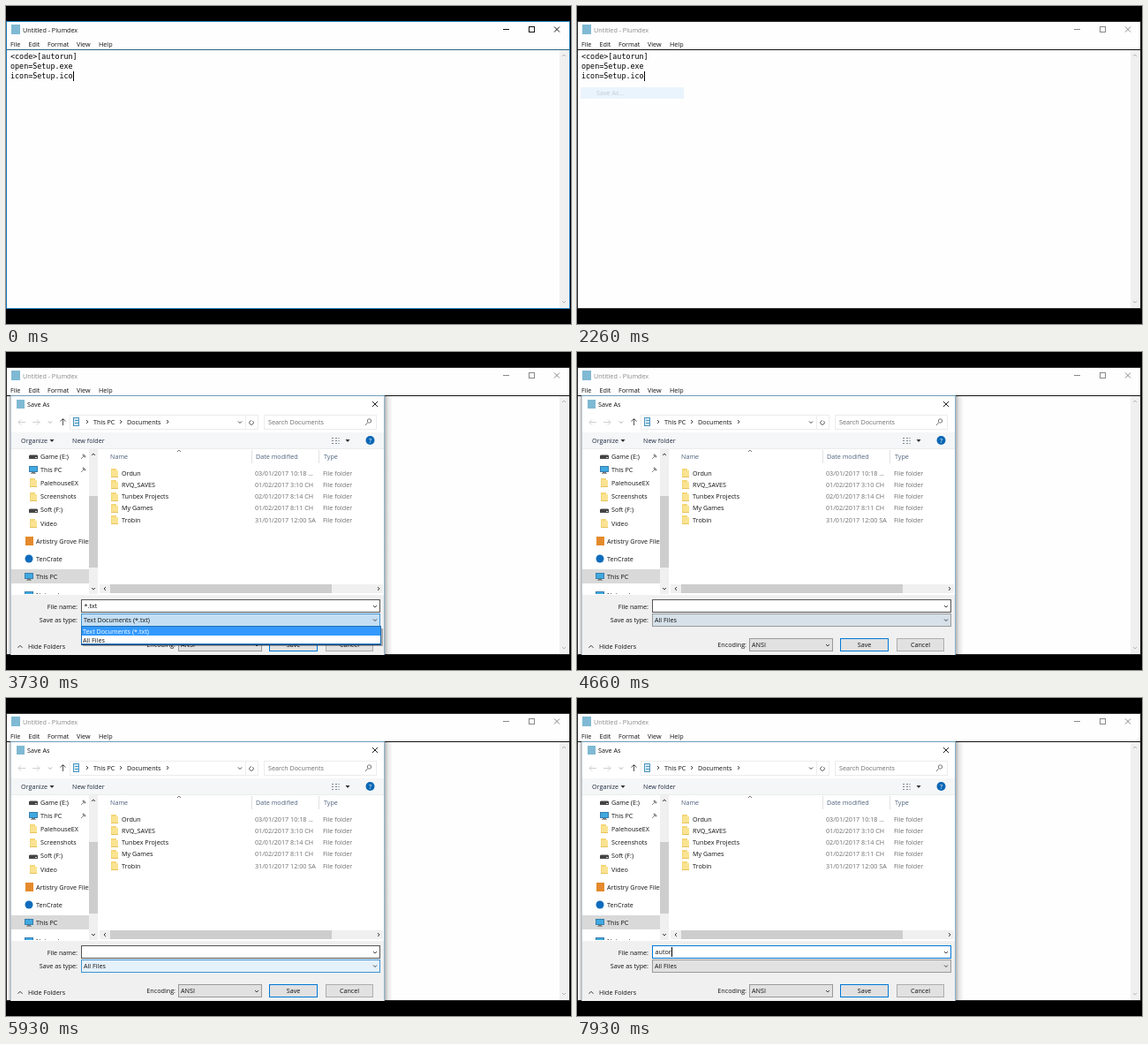
Recreate the animation shown at these times as an HTML page with a canvas. Size 640 by 360 pixels, loop 8 s.

```html
<!DOCTYPE html>
<html lang="en">
<head>
<meta charset="utf-8">
<title>Saving an autorun file</title>
<style>
html, body { margin: 0; width: 100%; height: 100%; overflow: hidden; background: #000; }
canvas { display: block; }
</style>
</head>
<body>
<canvas id="stage" width="640" height="360"></canvas>
<script>
const c = document.getElementById('stage').getContext('2d');
const LOOP = 8000;
const UI = '7.2px "Open Sans", "Noto Sans", sans-serif';
const MONO = '8.4px "DejaVu Sans Mono", "Liberation Mono", monospace';
const BLUE = '#0078d7', PICKED = '#3399ff', INK = '#111', GREY = '#6d6d6d';

// Moments at which the picture switches, in ms
const T = {
  menu: 1130, hover: 1600, pick: 2130, dialog: 2420,
  open: 3330, hoverAll: 4060, choose: 4330, focus: 6330
};
const TYPED = 'autor', TYPE_AT = 7330, KEY_MS = 133, BLINK = 530;

const clamp = v => Math.max(0, Math.min(1, v));
const ramp = (t, from, ms) => clamp((t - from) / ms);

function mix(a, b, k) {
  return `rgb(${a.map((v, i) => Math.round(v + (b[i] - v) * k)).join(',')})`;
}

function box(x, y, w, h, fill, edge) {
  if (fill) { c.fillStyle = fill; c.fillRect(x, y, w, h); }
  if (edge) { c.strokeStyle = edge; c.lineWidth = 1; c.strokeRect(x + .5, y + .5, w - 1, h - 1); }
}

// y is the middle of the capitals
function text(s, x, y, color = INK, align = 'left', font = UI) {
  c.font = font;
  c.textAlign = align;
  c.fillStyle = color;
  c.fillText(s, x, Math.round(y + 2.6));
}

function line(color, width, ...p) {
  c.strokeStyle = color;
  c.lineWidth = width;
  c.beginPath();
  for (let i = 0; i < p.length; i += 2) c.lineTo(p[i], p[i + 1]);
  c.stroke();
}

function disc(x, y, r, color) {
  c.fillStyle = color;
  c.beginPath();
  c.arc(x, y, r, 0, 7);
  c.fill();
}

function clip(x, y, w, h, draw) {
  c.save();
  c.beginPath();
  c.rect(x, y, w, h);
  c.clip();
  draw();
  c.restore();
}

// Soft shade that runs from x0 (dark) to x1 (clear)
function shade(x0, x1, y, h) {
  const g = c.createLinearGradient(x0, 0, x1, 0);
  g.addColorStop(0, 'rgba(0,0,0,.3)');
  g.addColorStop(.4, 'rgba(0,0,0,.1)');
  g.addColorStop(1, 'rgba(0,0,0,0)');
  box(Math.min(x0, x1), y, Math.abs(x1 - x0), h, g);
}

const down = (x, y, col = '#444', s = 2) => line(col, 1, x - s, y - s / 2, x, y + s / 2, x + s, y - s / 2);
const up = (x, y, col = '#444', s = 2) => line(col, 1, x - s, y + s / 2, x, y - s / 2, x + s, y + s / 2);
const right = (x, y, col = '#444', s = 2) => line(col, 1, x - s / 2, y - s, x + s / 2, y, x - s / 2, y + s);
const left = (x, y, col = '#444', s = 2) => line(col, 1, x + s / 2, y - s, x - s / 2, y, x + s / 2, y + s);

function triangle(x, y) {
  c.fillStyle = '#333';
  c.beginPath();
  c.moveTo(x - 2.5, y - 1);
  c.lineTo(x + 2.5, y - 1);
  c.lineTo(x, y + 2);
  c.fill();
}

function cross(x, y, col) {
  line(col, 1, x - 3, y - 3, x + 3, y + 3);
  line(col, 1, x + 3, y - 3, x - 3, y + 3);
}

function folder(x, y) {
  box(x, y - 5, 6, 10, '#f5d778');
  box(x + 1, y - 3, 7, 8, '#fae391');
  box(x, y + 4, 8, 1, '#e6c25c');
}

function drive(x, y) {
  box(x, y - 1, 10, 4, '#444');
  box(x + 1, y - 2, 8, 1, '#aaa');
  box(x + 7, y + 1, 2, 1, '#ddd');
}

function monitor(x, y) {
  box(x, y - 4, 10, 7, '#3fa9e0', '#3a7fae');
  box(x + 3, y + 3, 4, 1, '#777');
  box(x + 2, y + 4, 6, 1, '#999');
}

function pin(x, y) {
  line('#8a8a8a', 1, x - 3, y + 3, x, y);
  line('#8a8a8a', 2, x - 1, y - 2, x + 2, y + 1);
}

function editor(t) {
  const active = t < T.pick;
  const ink = active ? INK : '#888';
  box(0, 17, 639, 326, '#fefefe', active ? '#1a78b8' : '#222');
  box(6, 21, 10, 11, '#7fb9d3');
  text('Untitled - Plumdex', 19, 27, ink);
  line(ink, 1, 563, 26.5, 570, 26.5);
  box(592, 23, 7, 7, null, ink);
  cross(624, 26.5, ink);
  [['File', 5], ['Edit', 25.5], ['Format', 47], ['View', 80], ['Help', 105]]
    .forEach(([s, x]) => text(s, x, 43));
  box(1, 49, 637, 1, active ? '#2b6480' : '#111');
  box(627, 50, 11, 292, '#f0f0f0');
  up(632, 56, '#b5b5b5');
  down(632, 335, '#b5b5b5');

  ['<code>[autorun]', 'open=Setup.exe', 'icon=Setup.ico']
    .forEach((s, i) => text(s, 5, 57.4 + i * 11, '#000', 'left', MONO));
  if (t < 400 || Math.floor((t - 400) / BLINK) % 2) box(76, 74, 1, 11, '#000');
}

function fileMenu(t) {
  if (t < T.menu || t >= T.dialog) return;
  c.save();
  if (t >= T.pick) {
    // the chosen entry lingers and fades
    c.globalAlpha = t > T.pick + 200 ? 0 : .18 + .82 * (1 - ramp(t, T.pick, 130));
    box(4, 92, 117, 13, '#91c9f7');
    text('Save As...', 22, 98.5);
    c.restore();
    return;
  }
  c.globalAlpha = ramp(t, T.menu, 140);
  box(3, 35, 18, 14, '#cce8ff');
  text('File', 5, 43);
  box(2, 49, 121, 103, '#f2f2f2', '#ccc');
  const row = t < T.hover ? Math.floor(ramp(t, T.menu + 200, 400) * 3.99) : 3;
  if (t > T.menu + 200) box(4, 51.5 + row * 13.5, 117, 13, '#91c9f7');
  [['New', 58, 'Ctrl+N'], ['Open...', 71.5, 'Ctrl+O'], ['Save', 85, 'Ctrl+S'], ['Save As...', 98.5, ''],
   ['Page Setup...', 115, ''], ['Print...', 128, 'Ctrl+P'], ['Exit', 144, '']]
    .forEach(([s, y, key]) => {
      text(s, 22, y);
      text(key, 116, y, INK, 'right');
    });
  box(20, 107, 101, 1, '#d7d7d7');
  box(20, 136, 101, 1, '#d7d7d7');
  c.restore();
}

function addressBar() {
  box(12, 54, 9, 10, '#7fb9d3');
  text('Save As', 24, 59);
  cross(418, 59, '#222');
  line('#d0d0d0', 1, 22, 79.5, 14, 79.5);
  left(15.5, 79.5, '#d0d0d0', 3);
  line('#d0d0d0', 1, 30, 79.5, 38, 79.5);
  right(36.5, 79.5, '#d0d0d0', 3);
  down(50, 79.5, '#aaa');
  line('#555', 1, 64.5, 83, 64.5, 76);
  up(64.5, 77, '#555', 3);
  box(72, 71, 214, 17, '#fff', '#ececec');
  box(271, 72, 1, 15, '#ececec');
  box(76, 74, 7, 10, '#d6ebf7', '#4b95bf');
  box(78, 77, 4, 1, '#4b95bf');
  box(78, 80, 4, 1, '#4b95bf');
  [92, 130, 183].forEach(x => right(x, 79));
  text('This PC', 99, 79);
  text('Documents', 137, 79);
  down(265, 79.5);
  c.strokeStyle = '#555';
  c.lineWidth = 1;
  c.beginPath();
  c.arc(278, 80, 2.3, -.9, 4.6);
  c.stroke();
  box(292, 71, 128, 17, '#fff', '#ececec');
  text('Search Documents', 297, 79.3, GREY);
  c.strokeStyle = '#777';
  c.beginPath();
  c.arc(411.5, 78, 2.2, 0, 7);
  c.stroke();
  line('#777', 1, 409.5, 80, 407, 83);
}

function toolbar() {
  box(6, 91, 422, 18, '#f5f6f7');
  box(6, 109, 422, 1, '#ebebeb');
  text('Organize', 17, 100, '#1e2b40');
  text('New folder', 75, 100, '#1e2b40');
  triangle(52, 100);
  for (let i = 0; i < 3; i++) {
    box(369, 97 + i * 3, 2, 1, '#7c8790');
    box(373, 97 + i * 3, 2, 1, '#7c8790');
    box(376, 97 + i * 3, 2, 1, '#a5b0b8');
  }
  triangle(387, 100);
  disc(412.5, 100, 5, '#0a67b5');
  text('?', 412.5, 100, '#fff', 'center');
}

function navPane() {
  clip(6, 110, 88, 164, () => {
    box(6, 246, 88, 16, '#d9d9d9');
    [['Game (E:)', drive], ['This PC', monitor], ['PalehouseEX', folder],
     ['Screenshots', folder], ['Soft (F:)', drive], ['Video', folder]]
      .forEach(([s, icon], i) => {
        const y = 118 + i * 15.2;
        icon(icon === folder ? 27 : 26, Math.round(y));
        text(s, 39, y);
      });
    pin(88, 118);
    pin(88, 133);
    box(22, 209, 9, 10, '#e58a2c');
    text('Artistry Grove Files', 34, 214);
    disc(26, 234, 4.5, '#0f6cbd');
    text('TenCrate', 34, 234);
    monitor(21, 254);
    text('This PC', 34, 254);
    monitor(21, 275);
    text('Network', 34, 275);
  });
  box(94, 110, 10, 164, '#f0f0f0');
  box(94, 163, 10, 81, '#cdcdcd');
  up(99, 116);
  down(99, 268);
}

function fileList() {
  text('Name', 118, 118.5, '#4c607a');
  text('Date modified', 283, 118.5, '#4c607a');
  text('Type', 360, 118.5, '#4c607a');
  box(278, 111, 1, 15, '#e2e2e2');
  box(354, 111, 1, 15, '#e2e2e2');
  up(196, 112, '#777');
  [['Ordun', '03/01/2017 10:18 ...'], ['RVQ_SAVES', '01/02/2017 3:10 CH'],
   ['Tunbex Projects', '02/01/2017 8:14 CH'], ['My Games', '01/02/2017 8:11 CH'],
   ['Trobin', '31/01/2017 12:00 SA']]
    .forEach(([name, date], i) => {
      const y = 137 + i * 13.25;
      folder(119, Math.round(y));
      text(name, 131, y);
      text(date, 282, y, GREY);
      text('File folder', 359, y, GREY);
    });
  box(106, 263, 321, 10, '#f0f0f0');
  box(118, 263, 251, 10, '#cdcdcd');
  left(112, 268);
  right(422, 268);
}

function nameField(t) {
  const focused = t < T.open || t >= T.focus;
  box(85, 280, 339, 15, '#fff', focused ? BLUE : '#555');
  down(418, 288);
  if (t < T.open) {
    box(88, 282, 15, 11, BLUE);
    text('*.txt', 88.5, 287.5, '#fff');
  } else if (t < T.choose) {
    text('*.txt', 88.5, 287.5);
  } else if (t >= T.focus) {
    const n = t < TYPE_AT ? 0 : Math.min(TYPED.length, 1 + Math.floor((t - TYPE_AT) / KEY_MS));
    const s = TYPED.slice(0, n);
    text(s, 88.5, 287.5);
    const lit = n > 0 || Math.floor((t - T.focus) / BLINK) % 2 === 0;
    if (lit) box(Math.round(88.5 + c.measureText(s).width), 282, 1, 11, '#000');
  }
}

function typeCombo(t) {
  const rest = [225, 225, 225], pressed = [196, 223, 244], idle = [214, 225, 233], hover = [229, 241, 251];
  let fill = mix(rest, pressed, ramp(t, T.open - 70, 70));
  if (t >= T.choose) fill = mix(pressed, idle, ramp(t, T.choose, 200));
  if (t >= 5000) fill = mix(idle, hover, ramp(t, 5000, 200));
  if (t >= T.focus) fill = mix(hover, rest, ramp(t, T.focus, 250));
  const lit = (t >= T.open && t < T.choose) || (t >= 5000 && t < T.focus);
  box(85, 296, 339, 15, fill, lit ? '#3f93d2' : '#9a9a9a');
  text(t < T.choose ? 'Text Documents (*.txt)' : 'All Files', 88, 303.5);
  down(418, 303.5);
}

function typeList(t) {
  if (t < T.open || t >= T.choose) return;
  clip(85, 310, 343, 24 * ramp(t, T.open, 180), () => {
    const all = t >= T.hoverAll;
    box(87, 313, 340, 20, 'rgba(0,0,0,.3)');
    box(85, 310, 340, 21, '#fff', '#1f6fb5');
    box(86, all ? 321 : 311, 338, 10, PICKED);
    text('Text Documents (*.txt)', 87, 316, all ? INK : '#fff');
    text('All Files', 87, 326, all ? '#fff' : INK);
    box(85, 331, 340, 1, '#1f4f80');
  });
}

function footer(t) {
  box(6, 275, 422, 68, '#f0f0f0');
  text('File name:', 81, 288, INK, 'right');
  text('Save as type:', 81, 303.5, INK, 'right');
  nameField(t);
  typeCombo(t);
  up(16, 333.5, '#333', 2.5);
  text('Hide Folders', 25, 333);
  text('Encoding:', 192, 331.5, INK, 'right');
  box(195, 324, 95, 15, '#e1e1e1', '#9a9a9a');
  text('ANSI', 198, 331.5);
  down(284, 332);
  box(298, 324, 55, 15, '#e1e1e1', BLUE);
  text('Save', 325.5, 331.5, INK, 'center');
  box(362, 324, 54, 15, '#e1e1e1', '#adadad');
  text('Cancel', 389, 331.5, INK, 'center');
  typeList(t);
}

function dialog(t) {
  if (t < T.dialog) return;
  c.save();
  c.globalAlpha = ramp(t, T.dialog - 30, 130);
  shade(429, 438, 50, 293);
  shade(5, 1, 50, 293);
  box(5, 49, 424, 294, '#fff');
  addressBar();
  toolbar();
  navPane();
  fileList();
  footer(t);
  box(5, 49, 424, 1, '#6f9dbb');
  box(5, 50, 1, 293, '#b9c6cf');
  box(428, 50, 1, 293, '#8fb4cd');
  c.restore();
}

function draw(t) {
  box(0, 0, 640, 360, '#000');
  editor(t);
  fileMenu(t);
  dialog(t);
}

const start = performance.now();
function tick() {
  draw((performance.now() - start) % LOOP);
  requestAnimationFrame(tick);
}
tick();
</script>
</body>
</html>
```
